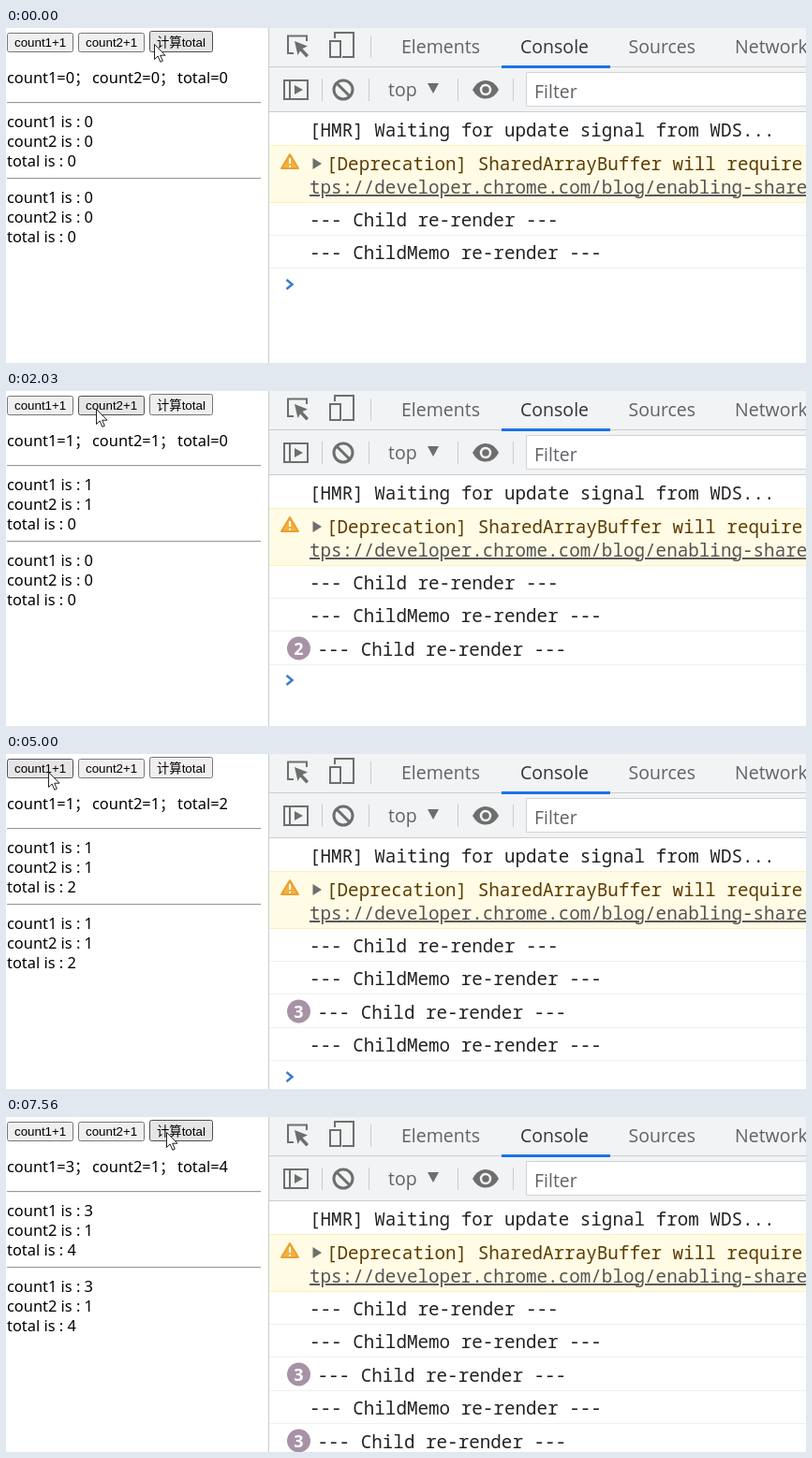
Write an HTML page that moves like this. It is 854 by 358 pixels and loops after 8490 ms.

```html
<!DOCTYPE html>
<html lang="en">
<head>
<meta charset="utf-8">
<title>Child and ChildMemo re-render</title>
<style>
html, body { margin: 0; width: 100%; height: 100%; overflow: hidden; background: #fff; }
svg { display: block; width: 854px; height: 358px; }
text { white-space: pre; }
.page { font: 16.4px "Noto Sans", "Noto Sans CJK SC", "Noto Sans CJK", sans-serif; }
.button { font: 13.333px "Liberation Sans", "Noto Sans CJK SC", "Noto Sans CJK", sans-serif; }
.tab { font: 19.5px "Open Sans", sans-serif; fill: #5f6368; }
.log { font: 19.25px "Noto Sans Mono", monospace; fill: #222; }
.badge { font: bold 18px "Open Sans", sans-serif; fill: #fff; text-anchor: middle; }
.link { text-decoration: underline; text-underline-offset: 1px; }
</style>
</head>
<body>
<svg viewBox="0 0 854 358">
  <g id="page" class="page"></g>
  <path d="M1 79.5H272M1 160.5H272" stroke="#9a9a9a"/>
  <path d="M1 80.5H272M1 161.5H272" stroke="#ededed"/>

  <!-- developer tools -->
  <path d="M281 0H854V89H281z" fill="#f1f3f4"/>
  <path d="M281 126H854V186H281z" fill="#fffbe5"/>
  <path d="M281 125.5H854M281 186.5H854" stroke="#fff0b8"/>
  <path d="M280.5 0V358M281 41.5H854M281 89.5H854" stroke="#cacdd1"/>
  <path d="M389.5 8V32M337.5 54V78M387.5 54V78M482.5 54V78M541.5 54V78" stroke="#ccc"/>
  <path d="M529 40H645V43H529z" fill="#1a73e8"/>
  <path d="M555.5 47.5H860V83.5H555.5z" fill="#fff" stroke="#d4d4d4"/>
  <g class="tab">
    <text x="422" y="27">Elements</text>
    <text x="549" y="27" style="fill:#333">Console</text>
    <text x="664.5" y="27">Sources</text>
    <text x="778" y="27">Network</text>
    <text x="408" y="73">top</text>
    <text x="564" y="75">Filter</text>
  </g>
  <g fill="none" stroke="#6e6e6e" stroke-width="2">
    <path d="M307 27H301V8.5H321V14"/>
    <path d="M351 11V5H371V31H359M346 14H357V31H346z"/>
    <path d="M297 56H322V76H297zM303 56V76"/>
    <g stroke-width="3">
      <circle cx="360" cy="66" r="10"/>
      <path d="M353 59L367 73"/>
    </g>
  </g>
  <g fill="#6e6e6e">
    <path d="M308 14L322 19.5L316.5 22L323 29L320.5 31.5L314 24.5L311.5 29z"/>
    <path d="M308 61L317 66L308 71zM450 59H462L456 70z"/>
    <path d="M498 66Q503 56 512 56T526 66Q521 75.5 512 75.5T498 66z"/>
    <circle cx="512" cy="66" r="5" stroke="#f1f3f4" stroke-width="2.5"/>
    <path d="M327.5 139L337 145L327.5 151z"/>
  </g>

  <path d="M303 135L312 150H294z" fill="#f4b13d" stroke="#e8a033" stroke-width="2" stroke-linejoin="round"/>
  <path d="M303 139V145M303 147V149" stroke="#fff" stroke-width="2"/>
  <g class="log">
    <text x="324" y="116">[HMR] Waiting for update signal from WDS...</text>
    <text x="342" y="152" style="fill:#5c3c00">[Deprecation] SharedArrayBuffer will require</text>
    <text x="324" y="177" class="link" style="fill:#545454">tps://developer.chrome.com/blog/enabling-shared-array-buffer/</text>
  </g>
  <g id="log"></g>

  <g id="buttons" class="button"></g>
  <circle id="halo" r="12" fill="#fff23a" opacity=".75" style="mix-blend-mode:multiply"/>
  <path id="cursor" d="M.5 .5V16.5L4.2 13L6.8 19.3L9.3 18.2L6.7 12.2H12z" fill="#fff" stroke="#222"/>
</svg>
<script>
const LOOP = 8490;
const $ = id => document.getElementById(id);

const buttons = [
  { x: 1, y: 5, w: 71, h: 21, label: "count1+1" },
  { x: 77, y: 5, w: 71, h: 21, label: "count2+1" },
  { x: 153, y: 3, w: 68, h: 23, label: "计算total" }
];
// start, end, number of steps, destination x and y
const moves = [
  [70, 420, 6, 48, 12],
  [1170, 1510, 6, 96, 19],
  [2560, 2560, 1, 97, 19],
  [2700, 2700, 1, 98, 18],
  [2900, 3180, 5, 175, 12],
  [4240, 5000, 12, 45, 19],
  [6680, 7090, 7, 171, 16]
];
// press, update, release, button
const clicks = [
  [690, 760, 830, 0],
  [1900, 1960, 2030, 1],
  [3640, 3710, 3780, 2],
  [5470, 5600, 5600, 0],
  [6280, 6350, 6410, 0],
  [7490, 7560, 7560, 2]
];

function pointer(t) {
  let x = 158, y = 17;
  for (const [start, end, steps, toX, toY] of moves) {
    if (t < start) break;
    const gap = (end - start) / (steps - 1 || 1) || 1;
    const step = t >= end ? steps : Math.min(steps, Math.floor((t - start + 10) / gap) + 1);
    const eased = 1 - (1 - step / steps) ** 2;
    x += (toX - x) * eased;
    y += (toY - y) * eased;
  }
  return [Math.round(x), Math.round(y)];
}

function stateAt(t) {
  const log = [];
  const print = name => {
    const last = log[log.length - 1];
    if (last && last.name === name) last.times++;
    else log.push({ name, times: 1 });
  };
  const counts = [0, 0];
  let total = 0, memo = [0, 0];
  print("Child");
  print("ChildMemo");
  for (const [, update, , button] of clicks) {
    if (t < update) break;
    print("Child");
    if (button < 2) counts[button]++;
    else {
      total = counts[0] + counts[1];
      memo = [...counts];
      print("ChildMemo");
    }
  }
  return { counts, total, memo, log };
}

const text = (x, y, s, cls = "") => `<text x="${x}" y="${y}" class="${cls}">${s}</text>`;

const child = (y, [a, b], total) =>
  text(1, y, `count1 is : ${a}`) + text(1, y + 21, `count2 is : ${b}`) + text(1, y + 42, `total is : ${total}`);

function drawPage({ counts, total, memo }) {
  return text(1, 59, `count1=${counts[0]}；`) + text(92, 59, `count2=${counts[1]}；`) +
    text(183, 59, `total=${total}`) + child(106, counts, total) + child(187, memo, total);
}

function drawLog({ log }) {
  const rows = log.map(({ name, times }, i) => {
    const y = Math.round(212 + 35.4 * i), many = times > 1;
    const badge = many
      ? `<circle cx="312.5" cy="${y - 8}" r="12.5" fill="#a792a6"/>` + text(312.5, y - 1, times, "badge")
      : "";
    return badge + text(many ? 332.5 : 324, y, `--- ${name} re-render ---`, "log") +
      `<path d="M281 ${y + 9.5}H854" stroke="#f0f0f0"/>`;
  });
  const y = Math.round(274 + 35.4 * (log.length - 2));
  return rows.join("") +
    `<path d="M299.5 ${y - 5}L305.5 ${y}L299.5 ${y + 5}" fill="none" stroke="#3b7dc8" stroke-width="2.5"/>`;
}

function drawButtons(px, py, pressed) {
  return buttons.map(({ x, y, w, h, label }) => {
    const hover = px >= x && px < x + w && py >= y && py < y + h;
    const [fill, stroke] = !hover ? ["#efefef", "#767676"] : pressed ? ["#f5f5f5", "#8d8d8d"] : ["#e5e5e5", "#4f4f4f"];
    return `<rect x="${x + 0.5}" y="${y + 0.5}" width="${w - 1}" height="${h - 1}" rx="2" fill="${fill}" stroke="${stroke}"/>` +
      text(x + 8, 20, label);
  }).join("");
}

function draw(t) {
  const [x, y] = pointer(t), state = stateAt(t);
  const pressed = clicks.some(([press, , release]) => t >= press && t < release);
  $("page").innerHTML = drawPage(state);
  $("log").innerHTML = drawLog(state);
  $("buttons").innerHTML = drawButtons(x, y, pressed);
  const place = `translate(${x} ${y})`;
  $("cursor").setAttribute("transform", place);
  $("halo").setAttribute("transform", place);
  $("halo").setAttribute("visibility", pressed ? "visible" : "hidden");
}

const began = performance.now();
function tick() {
  draw((performance.now() - began) % LOOP);
  requestAnimationFrame(tick);
}
tick();
</script>
</body>
</html>
```
